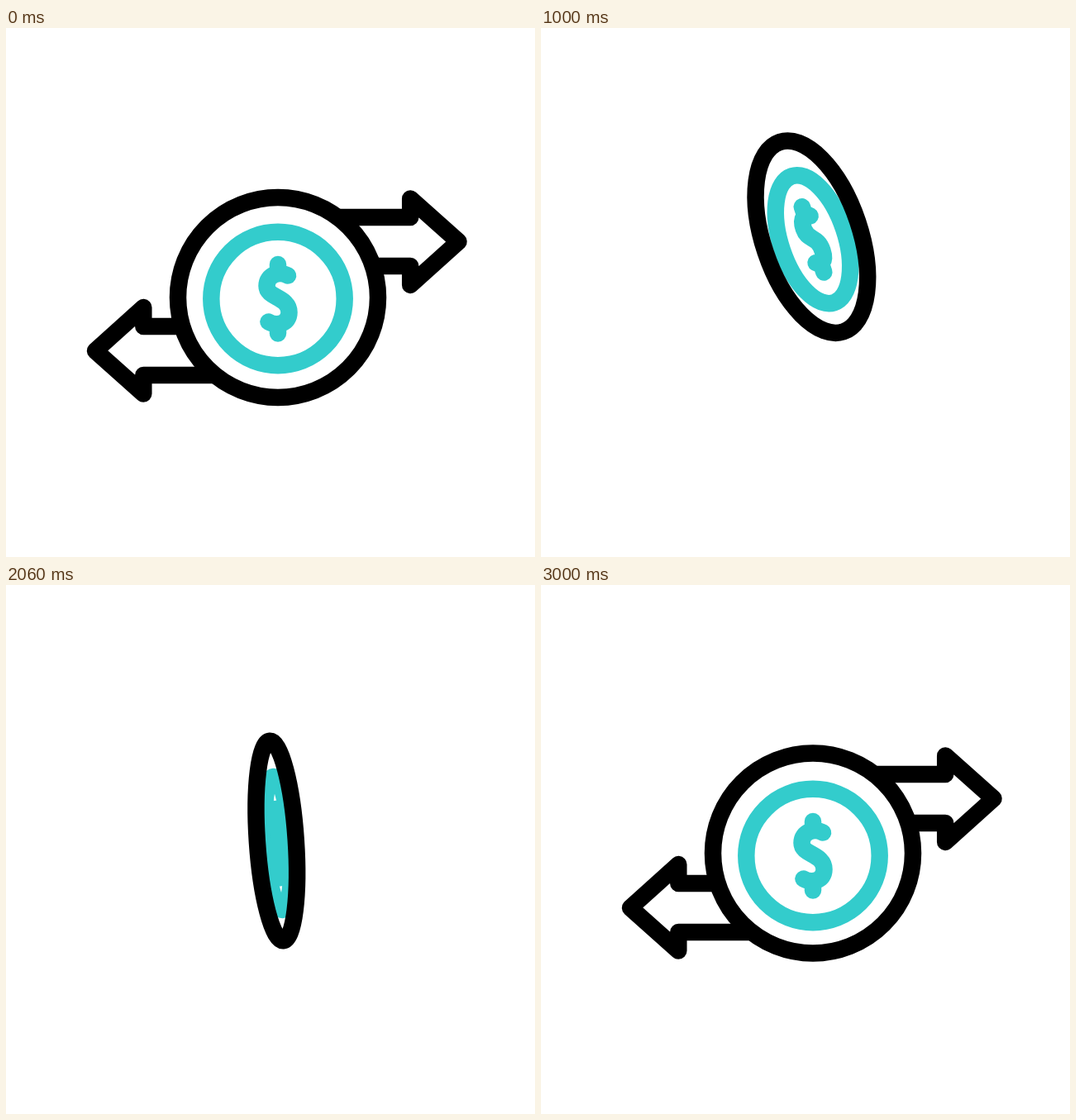
Recreate the animation shown at these times as an HTML page with a canvas. Size 640 by 640 pixels, loop 3.22 s.

```html
<!DOCTYPE html>
<html lang="en">
<head>
<meta charset="utf-8">
<title>Coin with two arrows</title>
<style>
html, body { margin: 0; width: 100%; height: 100%; overflow: hidden; background: #fff; }
canvas { display: block; }
</style>
</head>
<body>
<canvas id="stage" width="640" height="640"></canvas>
<script>
const LOOP = 3220, TEAL = '#33cccc', BLACK = '#000', TAU = Math.PI * 2;
const c = document.getElementById('stage').getContext('2d');

// Eased progress from 0 to 1 between two times
const ease = (t, from, to) => {
  const u = Math.min(1, Math.max(0, (t - from) / (to - from)));
  return u * u * (3 - 2 * u);
};

const arrow = new Path2D(
  'M395.5 229H489.2V206.5L547.5 258.5L489.2 311V288H397Z');
const dollar = new Path2D(
  'M12 -28C2 -33.5 -13.5 -29.5 -13.5 -15.5C-13.5 -.5 13.5 -2.5 13.5 16.5' +
  'C13.5 30.5 -1 33.5 -11.5 28M0 -41.5V-31M0 42V31');

function ring(x, y, r) {
  const p = new Path2D();
  p.arc(x, y, r, 0, TAU);
  p.closePath();
  return p;
}

// Transforms the outline only, so the line weight stays constant
function stroke(path, matrix, color) {
  const p = new Path2D();
  p.addPath(path, matrix);
  c.strokeStyle = color;
  c.stroke(p);
  return p;
}

function drawArrows(t) {
  const out = ease(t, 0, 600), back = ease(t, 2400, 3000);
  const home = t < 1200;
  const shift = home ? 300 * out : -108 * (1 - back);
  c.globalAlpha = home ? 1 - out : back;
  if (c.globalAlpha > 0) {
    stroke(arrow, new DOMMatrix([1, 0, 0, 1, shift, 0]), BLACK);
    stroke(arrow, new DOMMatrix([-1, 0, 0, -1, 655.5 - shift, 649]), BLACK);
  }
  c.globalAlpha = 1;
}

function drawCoin(t) {
  const lift = ease(t, 0, 1200) - ease(t, 1200, 2400);
  const half = Math.min(3, Math.floor(t / 600));
  const flip = 1 - 2 * ease(t, half * 600, half * 600 + 600);
  const turn = half % 2 ? -flip : flip;
  const place = x => new DOMMatrix()
    .translate(x, 327.5 - 77.5 * lift)
    .rotate(-20 * lift)
    .scale(turn, 1);

  const rim = ring(1.25, -1.5 - 1.5 * ease(t, 0, 600), 121);
  const rimPlace = place(327.75), face = place(329);
  const body = new Path2D();
  body.addPath(rim, rimPlace);
  c.fillStyle = '#fff';
  c.fill(body);
  stroke(ring(0, 0, 80.7), face, TEAL);
  stroke(dollar, face, TEAL);
  stroke(rim, rimPlace, BLACK);
}

function draw(t) {
  c.fillStyle = '#fff';
  c.fillRect(0, 0, 640, 640);
  c.lineWidth = 20.5;
  c.lineCap = c.lineJoin = 'round';
  drawArrows(t);
  drawCoin(t);
}

const start = performance.now();
function tick() {
  draw((performance.now() - start) % LOOP);
  requestAnimationFrame(tick);
}
tick();
</script>
</body>
</html>
```
